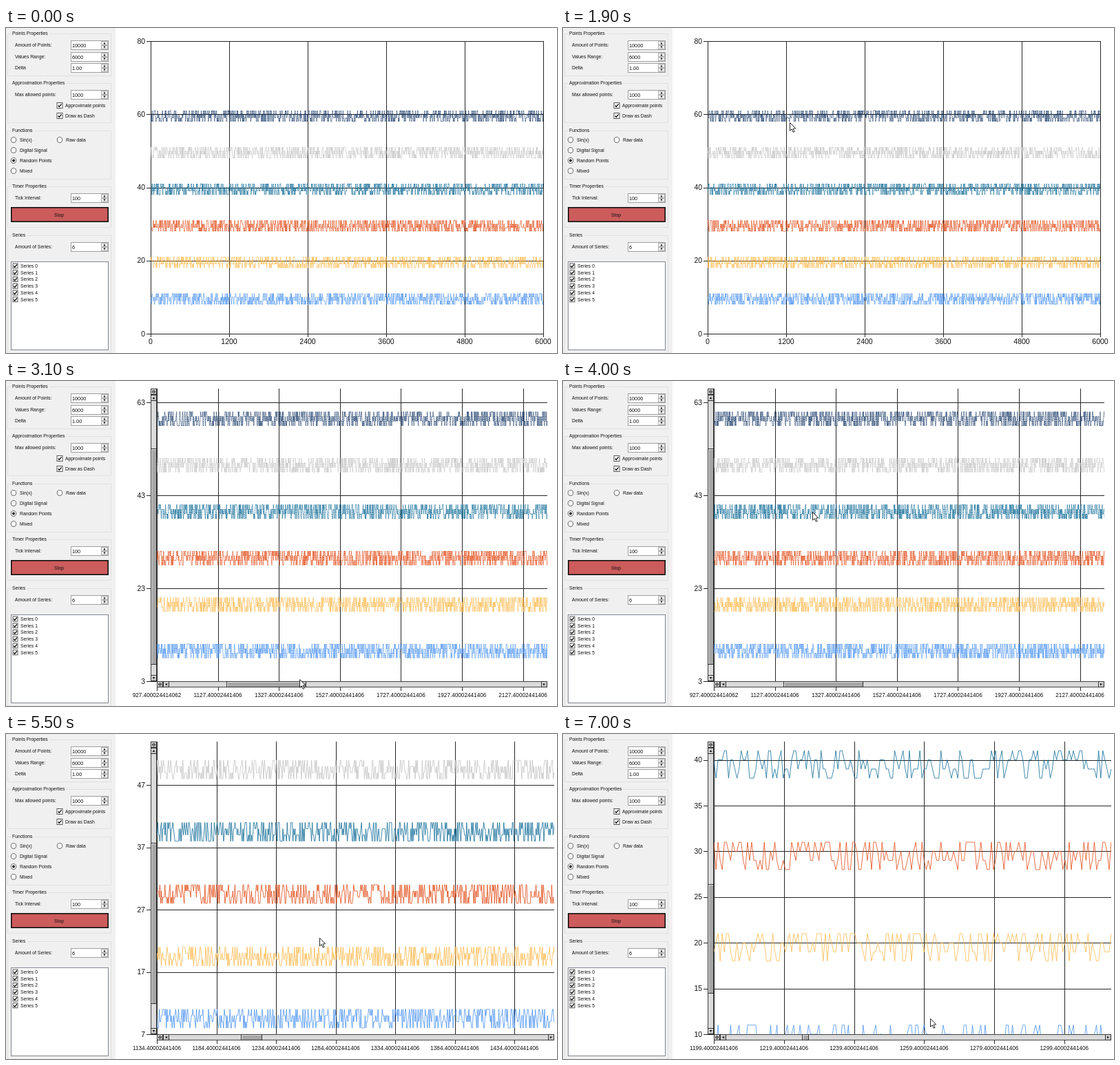
Write an HTML page with a canvas that moves like this. It is 800 px wide and 472 px high and loops after 7.1 s.

```html
<!DOCTYPE html>
<html lang="en">
<head>
<meta charset="utf-8">
<title>Random points chart</title>
<style>
  html, body { margin: 0; width: 100%; height: 100%; overflow: hidden; background: #fff; }
  canvas { display: block; }
</style>
</head>
<body>
<canvas id="stage" width="800" height="472"></canvas>
<script>
const ctx = document.getElementById('stage').getContext('2d');
const LOOP = 7100, TICK = 100;
const POINTS = 10000, RANGE = 6000, MAX_POINTS = 1000;
const FONT = '"Liberation Sans", Arial, sans-serif';
const GRID = '#262626';
const SERIES = ['#418cf0', '#fcb441', '#e0400a', '#056492', '#bfbfbf', '#1a3b69'];

// Visible ranges; every zoomed view adds scrollbars.
const VIEWS = [
  { from: 0, x0: 0, x1: RANGE, xStep: 1200, y0: 0, y1: 80, yStep: 20,
    left: 210, right: 780, top: 19, bottom: 444 },
  { from: 2500, x0: 927.4, x1: 2207.3, xStep: 200, y0: 3, y1: 66, yStep: 20, right: 786 },
  { from: 4600, x0: 1134.4, x1: 1467.9, xStep: 50, y0: 7, y1: 54, yStep: 10, right: 796 },
  { from: 5800, x0: 1199.4, x1: 1312.8, xStep: 20, y0: 10, y1: 42, yStep: 5, right: 796 }
].map(v => ({ left: 219, top: 11, bottom: 436, zoomed: v.from > 0, ...v }));

// Pointer path: time, x, y
const POINTER = [
  [500, 300, -20], [1000, 298, 40], [1600, 305, 92], [1700, 305, 92], [1900, 329, 137],
  [2300, 426, 433], [3200, 426, 433], [3700, 318, 92], [4000, 362, 190], [4500, 466, 403],
  [4900, 466, 403], [5200, 338, 120], [5700, 533, 413]
];

function randomFrom(seed) {
  let s = seed * 2654435761 | 0;
  return () => {
    s = s + 0x6d2b79f5 | 0;
    let r = Math.imul(s ^ s >>> 15, 1 | s);
    r = r + Math.imul(r ^ r >>> 7, 61 | r) ^ r;
    return ((r ^ r >>> 14) >>> 0) / 4294967296;
  };
}

function box(x, y, w, h, fill, stroke, width = 1) {
  ctx.fillStyle = fill;
  ctx.fillRect(x, y, w, h);
  if (!stroke) return;
  ctx.strokeStyle = stroke;
  ctx.lineWidth = width;
  ctx.strokeRect(x + width / 2, y + width / 2, w - width, h - width);
}

function text(str, x, y, size = 6.8, align = 'left') {
  ctx.font = `${size}px ${FONT}`;
  ctx.textAlign = align;
  ctx.fillStyle = '#111';
  ctx.fillText(str, x, y + size * 0.355);
}

function path(points, close) {
  ctx.beginPath();
  points.forEach(([x, y]) => ctx.lineTo(x, y));
  if (close) ctx.closePath();
}

function triangle(x, y, dx, dy, size) {
  path([
    [x + dx * size, y + dy * size],
    [x - dx * size + dy * size, y - dy * size + dx * size],
    [x - dx * size - dy * size, y - dy * size - dx * size]
  ], true);
  ctx.fillStyle = '#111';
  ctx.fill();
}

function group(title, y, bottom) {
  ctx.strokeStyle = '#e0e0e0';
  ctx.lineWidth = 1;
  ctx.strokeRect(2.5, y + 0.5, 150, bottom - y);
  ctx.font = `6.8px ${FONT}`;
  box(7, y - 3, ctx.measureText(title).width + 4, 7, '#f0f0f0');
  text(title, 9, y);
}

function spinner(label, value, y) {
  text(label, 13, y);
  box(94, y - 7, 55, 14, '#fff', '#a0a0a0');
  text(value, 96, y, 7.3);
  for (const dir of [-1, 1]) {
    box(138, dir < 0 ? y - 6 : y, 10, 6, '#ececec', '#b4b4b4');
    triangle(143, y + dir * 3, 0, dir, 1.4);
  }
}

function check(label, x, y, size, gap) {
  box(x - size / 2, y - size / 2, size, size, '#fff', '#555');
  path([[x - 2.3, y], [x - 0.7, y + 2], [x + 2.5, y - 2.2]]);
  ctx.strokeStyle = '#111';
  ctx.lineWidth = 1.3;
  ctx.stroke();
  text(label, x + gap, y);
}

function radio(label, x, y, on) {
  const disc = (r, color) => {
    ctx.beginPath();
    ctx.arc(x, y, r, 0, 7);
    ctx.fillStyle = color;
    ctx.fill();
  };
  disc(4.2, '#444');
  disc(3.4, '#fff');
  if (on) disc(2, '#222');
  text(label, x + 9, y);
}

function drawPanel() {
  box(0, 0, 159, 472, '#f0f0f0');
  group('Points Properties', 8, 69);
  spinner('Amount of Points:', '10000', 25);
  spinner('Values Range:', '6000', 42);
  spinner('Delta', '1.00', 58);

  group('Approximation Properties', 80, 137);
  spinner('Max allowed points:', '1000', 97);
  check('Approximate points', 78, 112.5, 9, 8);
  check('Draw as Dash', 78, 127.5, 9, 8);

  group('Functions', 149, 219);
  radio('Sin(x)', 11, 162.5);
  radio('Raw data', 78, 162.5);
  radio('Digital Signal', 11, 177.5);
  radio('Random Points', 11, 192.5, true);
  radio('Mixed', 11, 207.5);

  group('Timer Properties', 230, 289);
  spinner('Tick Interval:', '100', 247);
  box(7, 260, 142, 22, '#cd5c5c', '#111', 1.6);
  text('Stop', 77, 271.5, 6.8, 'center');

  group('Series', 301, 473);
  spinner('Amount of Series:', '6', 318);
  box(7, 339, 142, 129, '#fff', '#828790');
  SERIES.forEach((_, i) => check('Series ' + i, 13.5, 345.5 + i * 9.75, 8, 7.5));
}

function line(x1, y1, x2, y2) {
  ctx.beginPath();
  ctx.moveTo(x1, y1);
  ctx.lineTo(x2, y2);
  ctx.stroke();
}

function drawAxes(v, px, py) {
  const crisp = n => Math.round(n) + 0.5;
  const tickX = v.zoomed ? 210 : v.left;
  const tickY = v.zoomed ? 445 : v.bottom;
  ctx.strokeStyle = GRID;
  ctx.lineWidth = 1;
  for (let x = v.x0; x <= v.x1; x += v.xStep) {
    const at = crisp(px(x));
    line(at, v.top, at, tickY + 5);
    const whole = Math.floor(x + 0.01);
    const label = v.zoomed ? whole + '.40002441406' + (whole < 1000 ? '2' : '') : String(whole);
    text(label, px(x), 455.7, v.zoomed ? 8.2 : 10.5, 'center');
  }
  for (let y = v.y0; y <= v.y1; y += v.yStep) {
    const at = crisp(py(y));
    line(tickX - 6, at, v.right, at);
    text(String(y), 202, py(y), 10.3, 'right');
  }
}

function drawSeries(v, px, py, tick) {
  const spacing = RANGE / POINTS;
  const span = v.x1 - v.x0;
  const approximate = span / spacing > MAX_POINTS;
  const step = approximate ? span / MAX_POINTS : spacing;
  const start = Math.floor(v.x0 / step) * step;
  ctx.save();
  ctx.beginPath();
  ctx.rect(v.left, v.top, v.right - v.left, v.bottom - v.top);
  ctx.clip();
  ctx.lineWidth = 0.75;
  ctx.setLineDash(approximate ? [2, 0.65] : []);
  SERIES.forEach((color, s) => {
    const random = randomFrom(tick * 11 + s + 1);
    const sample = () => py(s * 10 + 8 + Math.floor(random() * 4));
    let y = sample();
    ctx.beginPath();
    ctx.moveTo(px(start), y);
    for (let x = start; x < v.x1; x += step) {
      // Separate segments restart the dash at every point.
      if (approximate) ctx.moveTo(px(x), y);
      y = sample();
      ctx.lineTo(px(x + step), y);
    }
    ctx.strokeStyle = color;
    ctx.stroke();
  });
  ctx.restore();
}

function raised(x, y, w, h, fill) {
  box(x, y, w, h, fill, '#333');
  box(x + 1, y + 1, w - 2, 1, '#e4e4e4');
  box(x + 1, y + 1, 1, h - 2, '#e4e4e4');
}

function scrollButton(x, y, dx, dy) {
  raised(x, y, 9, 9, '#c4c4c4');
  if (dx || dy) return triangle(x + 4.5, y + 4.5, dx, dy, 1.6);
  ctx.beginPath();
  ctx.arc(x + 4.5, y + 4.5, 2, 0, 7);
  ctx.moveTo(x + 2.5, y + 4.5);
  ctx.lineTo(x + 6.5, y + 4.5);
  ctx.strokeStyle = '#222';
  ctx.lineWidth = 0.8;
  ctx.stroke();
}

function drawScrollbars(v) {
  const sy = y => Math.round(427 - y / 80 * 399);
  const sx = x => Math.round(237 + x / RANGE * (v.right - 246));
  box(210, 11, 9, 425, '#dadada', '#444');
  raised(210, sy(v.y1), 9, sy(v.y0) - sy(v.y1), '#a6a6a6');
  scrollButton(210, 11, 0, 0);
  scrollButton(210, 20, 0, -1);
  scrollButton(210, 427, 0, 1);
  box(219, 436, v.right - 219, 9, '#dadada', '#444');
  raised(sx(v.x0), 436, sx(v.x1) - sx(v.x0), 9, '#a6a6a6');
  scrollButton(219, 436, 0, 0);
  scrollButton(228, 436, -1, 0);
  scrollButton(v.right - 9, 436, 1, 0);
}

function drawPointer(time) {
  if (time < POINTER[0][0]) return;
  let i = POINTER.findIndex(p => p[0] > time);
  if (i < 0) i = POINTER.length - 1;
  const [t0, x0, y0] = POINTER[i - 1], [t1, x1, y1] = POINTER[i];
  const k = Math.min(1, (time - t0) / (t1 - t0));
  ctx.save();
  ctx.translate(x0 + (x1 - x0) * k + 0.5, y0 + (y1 - y0) * k + 0.5);
  path([[0, 0], [0, 11.7], [2.7, 9.3], [4.7, 13.8], [6.6, 13], [4.6, 8.6], [8.3, 8.4]], true);
  ctx.fillStyle = '#fff';
  ctx.fill();
  ctx.strokeStyle = '#111';
  ctx.lineWidth = 0.9;
  ctx.stroke();
  ctx.restore();
}

function draw(now) {
  const tick = Math.floor(now % LOOP / TICK);
  const time = tick * TICK;
  const v = VIEWS.filter(view => view.from <= time).pop();
  const px = x => v.left + (x - v.x0) / (v.x1 - v.x0) * (v.right - v.left);
  const py = y => v.bottom - (y - v.y0) / (v.y1 - v.y0) * (v.bottom - v.top);
  box(0, 0, 800, 472, '#fff');
  drawPanel();
  drawAxes(v, px, py);
  drawSeries(v, px, py, tick);
  if (v.zoomed) drawScrollbars(v);
  drawPointer(time);
}

const begin = performance.now();
function frame() {
  draw(performance.now() - begin);
  requestAnimationFrame(frame);
}
frame();
</script>
</body>
</html>
```
